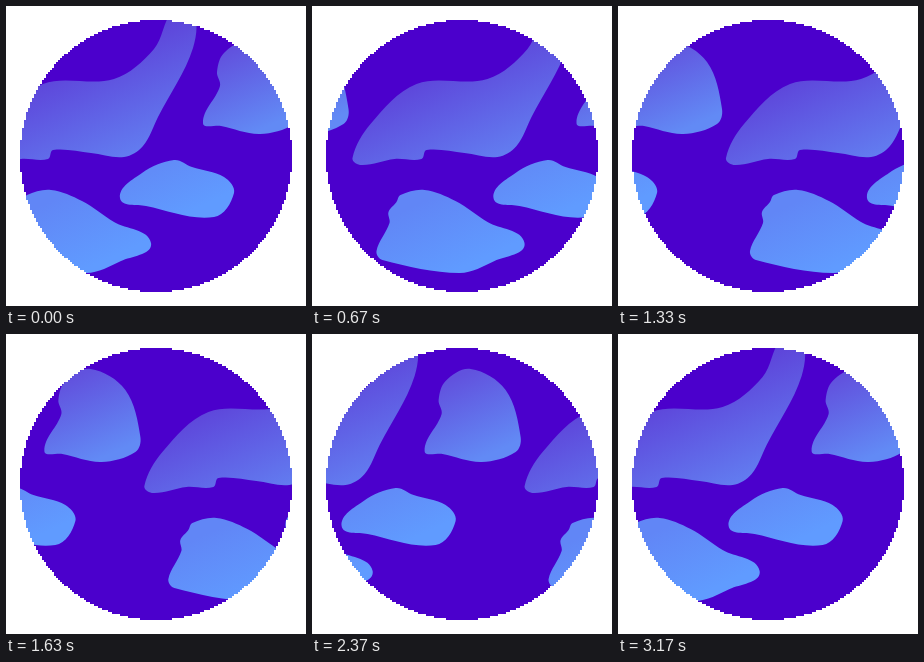
Recreate the animation shown at these times as an HTML page. Size 300 by 300 pixels, loop 3210 ms.

```html
<!DOCTYPE html>
<html lang="en">
<head>
<meta charset="utf-8">
<title>Spinning planet</title>
<style>
  html, body { margin: 0; width: 100%; height: 100%; overflow: hidden; background: #fff; }
  svg { display: block; width: 100vw; height: 100vh; }
</style>
</head>
<body>
<svg viewBox="0 0 300 300">
  <defs></defs>
  <rect width="300" height="300" fill="#4b00cc"/>
  <g id="land"></g>
  <path id="space" fill="#fff" fill-rule="evenodd" shape-rendering="crispEdges"/>
</svg>
<script>
const LOOP = 3210, FRAMES = 96, FRAME_MS = 100 / 3, WIDTH = 324;
const CENTER = 150, RADIUS = 136, CELL = 2, SLANT = 0.45;

// Key points of each outline (leftmost first), then where its shade starts and ends.
const lands = [
  { pts: [[-27,152], [-9,118], [37,78], [108,73], [148,43], [166,6], [186,2], [187,42],
          [152,111], [137,140], [118,151], [85,147], [47,144], [42,153], [15,153], [-18,159]],
    shade: [91, 196], colors: ['#5d40d8', '#627cf0'] },
  { pts: [[197,117], [214,80], [211,66], [218,47], [243,35], [278,56], [293,103], [288,118],
          [254,128], [215,120]],
    shade: [57, 134], colors: ['#6152de', '#628af5'] },
  { pts: [[114,192], [136,167], [168,154], [186,161], [218,171], [228,187], [208,211], [140,200]],
    shade: [180, 227], colors: ['#618cf8', '#609bff'] },
  { pts: [[-3,245], [10,217], [9,206], [17,196], [21,189], [45,184], [76,195], [108,216],
          [145,237], [115,255], [80,267], [3,254]],
    shade: [217, 286], colors: ['#6186f6', '#609bff'] }
];

// Closed smooth curve; handle lengths follow the length of each segment.
function smooth(pts) {
  const n = pts.length, at = i => pts[(i + n) % n];
  const dir = i => {
    const [a, b] = at(i - 1), [c, d] = at(i + 1), len = Math.hypot(c - a, d - b);
    return [(c - a) / len, (d - b) / len];
  };
  let path = 'M' + pts[0];
  for (let i = 0; i < n; i++) {
    const [x, y] = at(i), [u, v] = at(i + 1);
    const h = Math.hypot(u - x, v - y) / 3;
    const [p, q] = dir(i), [r, s] = dir(i + 1);
    path += `C${x + p * h} ${y + q * h} ${u - r * h} ${v - s * h} ${u} ${v}`;
  }
  return path + 'Z';
}

// Everything outside the disc, whose rim is stepped in small cells.
function outside() {
  let path = 'M0 0H300V300H0Z';
  for (let y = CENTER - RADIUS; y < CENTER + RADIUS; y += CELL) {
    const dy = y + CELL / 2 - CENTER;
    const half = CELL * Math.round(Math.sqrt(RADIUS ** 2 - dy ** 2) / CELL);
    path += `M${CENTER - half} ${y}h${2 * half}v${CELL}h${-2 * half}Z`;
  }
  return path;
}

function gradient({ pts, shade: [y1, y2], colors }, i) {
  const x = pts[0][0];
  return `<linearGradient id="shade${i}" gradientUnits="userSpaceOnUse"
      x1="${x}" x2="${x + SLANT * (y2 - y1)}" y1="${y1}" y2="${y2}">
    <stop stop-color="${colors[0]}"/><stop offset="1" stop-color="${colors[1]}"/>
  </linearGradient>`;
}

const group = document.getElementById('land');
const strip = lands.map(({ pts }, i) => `<path d="${smooth(pts)}" fill="url(#shade${i})"/>`).join('');
document.querySelector('defs').innerHTML = lands.map(gradient).join('');
document.getElementById('space').setAttribute('d', outside());
group.innerHTML = `<g>${strip}</g><g transform="translate(${-WIDTH})">${strip}</g>`;

const start = performance.now();
function draw(now) {
  const t = Math.max(0, now - start) % LOOP;
  const step = Math.min(FRAMES - 1, Math.floor((t + 5) / FRAME_MS));
  group.setAttribute('transform', `translate(${step * WIDTH / FRAMES})`);
  requestAnimationFrame(draw);
}
draw(start);
</script>
</body>
</html>
```
